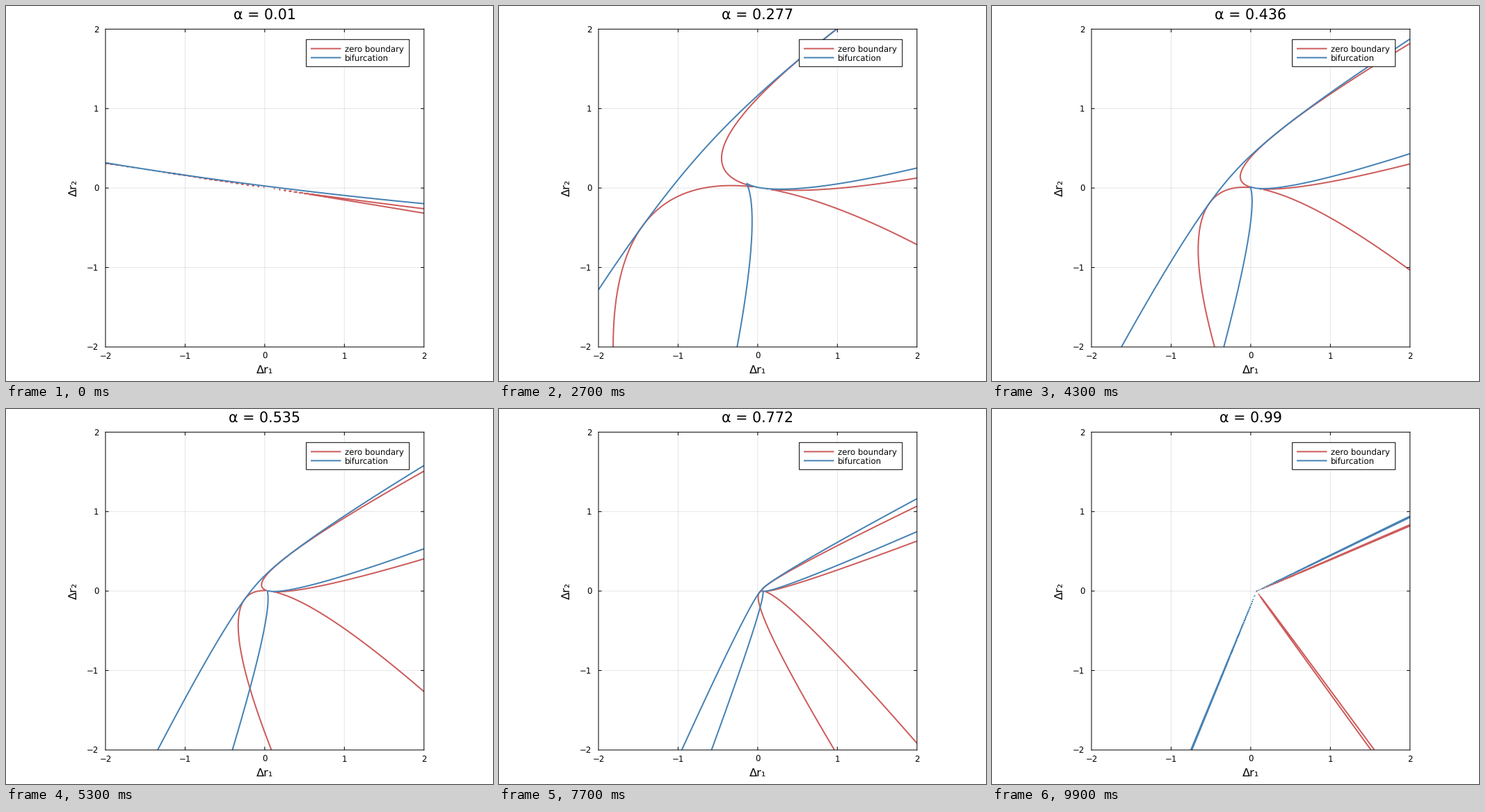
A matplotlib script for the animation above (10000 ms loop, 700 by 540 pixels).

```python
import numpy as np
import matplotlib.pyplot as plt
from matplotlib.animation import FuncAnimation
from matplotlib.patches import Rectangle

W, H, DPI = 700, 540, 100
PX = 72 / DPI                      # points per pixel
LEFT, RIGHT, TOP, BOTTOM = 143, 600.8, 33.3, 491
FRAMES, INTERVAL = 100, 100
RED, BLUE = "#cd5c5c", "#4682b4"

plt.rcParams.update({"font.family": "DejaVu Sans", "path.snap": False,
                     "text.hinting": "none"})

# Quadratic equilibrium map in an oblique basis:
#   U = A s + C t + s^2 + P s t,   V = B s + E t + t^2 + Q s t
A, B, C, E = -0.72055, -0.46194, 1.15258, 0.76512
P, Q = -1.8993, -0.3282
SKEW_1, SKEW_2 = 0.4307, 0.7305
CX, CY = 0.073, -0.003

axis = np.linspace(-2, 2, 401)
gx, gy = np.meshgrid(axis, axis)
BASE_U = (gx - CX + SKEW_2 * (gy - CY)) / (1 + SKEW_1 * SKEW_2)
BASE_V = SKEW_1 * BASE_U - (gy - CY)


def zero_boundary(U, V):
    """Vanishes where an equilibrium has s = 0 or t = 0."""
    on_t = V * V + A * B * V - B * B * U
    on_s = U * U + E * C * U - C * C * V
    return on_t * on_s


def bifurcation(U, V):
    """Discriminant of the quartic in s left after eliminating t."""
    g0, g1, g2 = C * E, P * E + C * Q, P * Q
    a = 1 - g2
    b = 2 * A - g1 - A * g2 + B * P * P
    c = A * A - 2 * U - g0 - A * g1 + g2 * U + 2 * B * C * P - P * P * V
    d = -2 * A * U - A * g0 + g1 * U + B * C * C - 2 * C * P * V
    e = U * U + g0 * U - C * C * V
    i = 12 * a * e - 3 * b * d + c * c
    j = (72 * a * c * e + 9 * b * c * d - 27 * a * d * d
         - 27 * b * b * e - 2 * c * c * c)
    s0 = -C / P
    spurious = U - A * s0 - s0 * s0
    return (4 * i * i * i - j * j) / (spurious * spurious)


fig = plt.figure(figsize=(W / DPI, H / DPI), dpi=DPI, facecolor="white")

ax = fig.add_axes([LEFT / W, 1 - BOTTOM / H,
                   (RIGHT - LEFT) / W, (BOTTOM - TOP) / H])
ax.set(xlim=(-2, 2), ylim=(-2, 2), xticks=[], yticks=[])
for spine in ax.spines.values():
    spine.set_linewidth(PX)
for g in (-1, 0, 1):
    for rule in (ax.axvline, ax.axhline):
        rule(g, color="black", alpha=0.1, lw=PX, zorder=0.5)
        for start, end in ((0, 0.01), (0.99, 1)):
            rule(g, start, end, color="black", lw=PX, zorder=2.5,
                 solid_capstyle="butt")

# Overlay in pixel coordinates for text and legend
stage = fig.add_axes([0, 0, 1, 1], zorder=5)
stage.set(xlim=(0, W), ylim=(H, 0))
stage.axis("off")


def label(x, y, text, size, ha="center", va="baseline", **kw):
    return stage.text(x, y, text, fontsize=size * PX, ha=ha, va=va, **kw)


def tick_text(v):
    return str(v).replace("-", "\u2212")


mid_x, mid_y = (LEFT + RIGHT) / 2, (TOP + BOTTOM) / 2
unit = (RIGHT - LEFT) / 4
for v in range(-2, 3):
    label(mid_x + v * unit, 507.6, tick_text(v), 11.8)
    label(133.3, mid_y - v * unit + 4.3, tick_text(v), 11.8, ha="right")

title = label(mid_x, 18.5, "", 20.65)
label(mid_x, 529, "Δr₁", 16.2)
label(105, mid_y, "Δr₂", 16.2, ha="right", va="center", rotation=90)

stage.add_patch(Rectangle((431.6, 48.3), 148.1, 39, fc="white", ec="black",
                          lw=PX, zorder=2))
for y, color, name in ((61.4, RED, "zero boundary"), (74.4, BLUE, "bifurcation")):
    stage.plot([438, 481.5], [y, y], color=color, lw=2 * PX, zorder=3,
               solid_capstyle="butt")
    label(487, y + 4.1, name, 11.8, ha="left", zorder=3)

curves = []


def update(n):
    alpha = 0.01 + 0.98 * n / (FRAMES - 1)
    # Every curve keeps its shape and shrinks towards (CX, CY)
    scale = (1 - alpha) ** 2 / alpha
    U, V = BASE_U / scale, BASE_V / scale
    while curves:
        curves.pop().remove()
    for func, color in ((zero_boundary, RED), (bifurcation, BLUE)):
        curves.append(ax.contour(axis, axis, func(U, V), levels=[0],
                                 colors=[color], linewidths=2 * PX, zorder=2))
    title.set_text(f"α = {round(alpha, 3)}")
    return [title]


anim = FuncAnimation(fig, update, frames=FRAMES, interval=INTERVAL,
                     init_func=lambda: [], repeat=True, repeat_delay=0)
plt.show()
```
